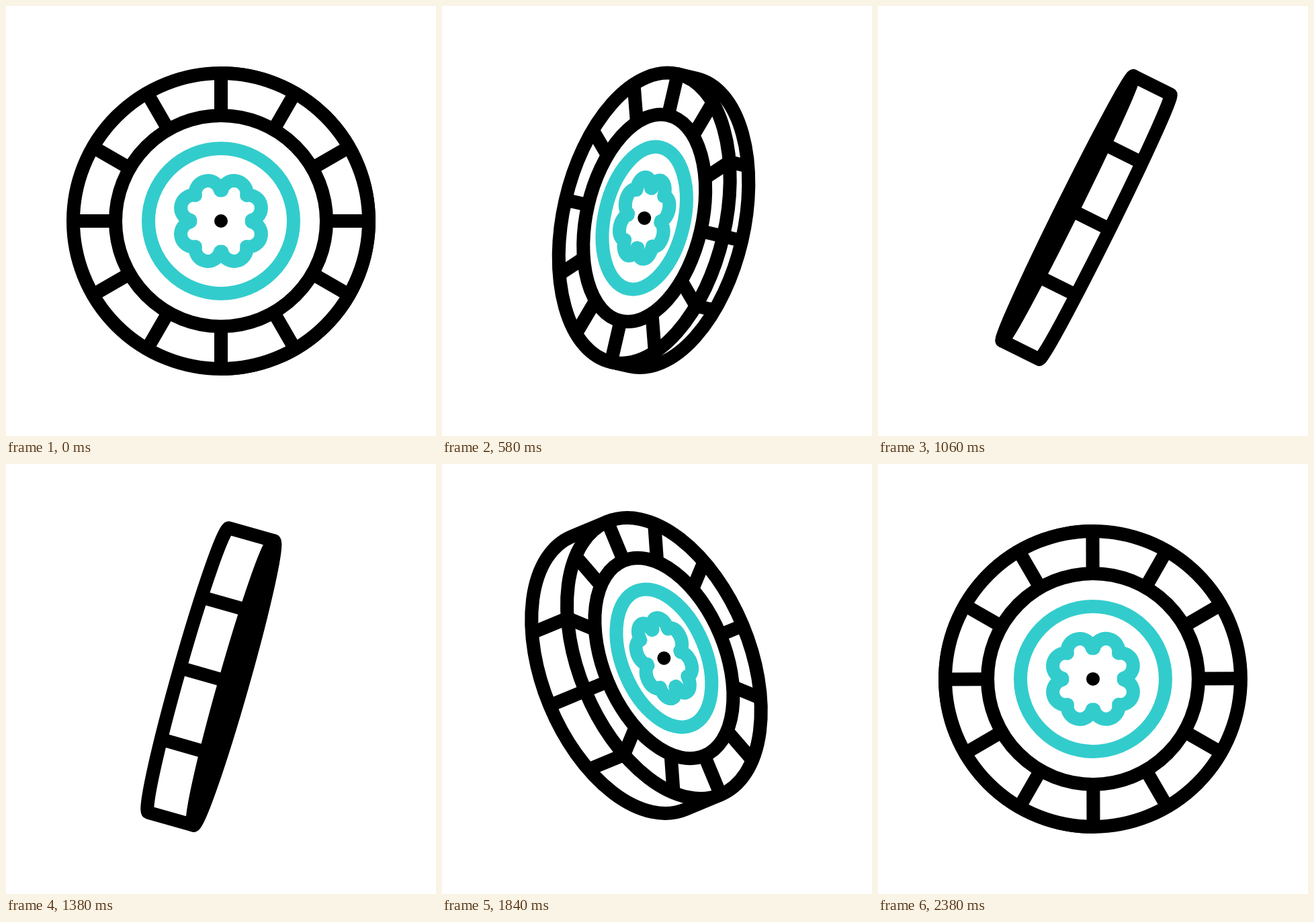
Write an HTML page with a canvas that moves like this. It is 640 px wide and 640 px high and loops after 2.4 s.

```html
<!DOCTYPE html>
<html>
<head>
<meta charset="utf-8">
<style>
  html, body { margin: 0; width: 100%; height: 100%; overflow: hidden; background: #fff; }
  canvas { display: block; }
</style>
</head>
<body>
<canvas id="stage" width="640" height="640"></canvas>
<script>
const ctx = document.getElementById('stage').getContext('2d');
const LOOP = 2400, HALF = LOOP / 2;
const RIM = 220, INNER = 157, DISC = 108, THICK = 70;
const DEG = Math.PI / 180, TEAL = '#33cccc';

// Smooth moves between [time, value] stops
function glide(time, ...stops) {
  let [from, value] = stops[0];
  for (const [to, next] of stops) {
    if (time <= from) break;
    const u = Math.min(1, (time - from) / (to - from || 1));
    value += (next - value) * u * u * (3 - 2 * u);
    from = to;
  }
  return value;
}

// Starts at speed and comes to rest edge-on
const quarterTurn = p => 90 * (1.2 * p + 0.6 * p * p - 0.8 * p ** 3);

function pose(time) {
  return {
    turn: time < HALF ? quarterTurn(time / HALF) : 180 - quarterTurn((LOOP - time) / HALF),
    lean: glide(time, [0, 0], [1200, 27.4], [1780, -22.5], [1980, -22.5], [LOOP, 0]),
    thickness: THICK * Math.min(1, time / HALF, (LOOP - time) / 410),
    x: glide(time, [1200, 320], [1620, 313.5], [1980, 313.5], [LOOP, 320]),
    y: glide(time, [1460, 320], [1920, 294], [LOOP, 320])
  };
}

// Builds a path on the foreshortened face, then strokes it at constant width
function strokeOnFace(x, squash, color, build, fill) {
  ctx.save();
  ctx.translate(x, 0);
  ctx.scale(squash, 1);
  ctx.beginPath();
  build();
  ctx.restore();
  if (fill) ctx.fill();
  ctx.strokeStyle = color;
  ctx.stroke();
}

const circle = r => () => {
  ctx.arc(0, 0, r, 0, 2 * Math.PI);
  ctx.closePath();
};

// Four heart-shaped leaves, each of two arcs
function clover() {
  ctx.rotate(45 * DEG);
  for (let leaf = 0; leaf < 4; leaf++) {
    ctx.arc(42.8, -15.2, 18.9, -121 * DEG, 54 * DEG);
    ctx.arc(42.8, 15.2, 18.9, -54 * DEG, 121 * DEG);
    ctx.lineTo(32.5, 32.5);
    ctx.rotate(90 * DEG);
  }
  ctx.closePath();
}

function spokes() {
  for (let a = 0; a < 360; a += 30) {
    const x = Math.cos(a * DEG), y = Math.sin(a * DEG);
    ctx.moveTo(INNER * x, INNER * y);
    ctx.lineTo(RIM * x, RIM * y);
  }
}

function drawSide(face, far, squash) {
  const toFar = far < face ? -1 : 1;
  ctx.strokeStyle = '#000';
  ctx.beginPath();
  ctx.moveTo(face, -RIM);
  ctx.ellipse(far, 0, RIM * squash, RIM, 0, -Math.PI / 2, Math.PI / 2, toFar < 0);
  ctx.lineTo(face, RIM);
  ctx.closePath();
  ctx.fill();
  ctx.stroke();
  ctx.beginPath();
  for (const a of [-30, 0, 30]) {
    const x = toFar * RIM * squash * Math.cos(a * DEG), y = RIM * Math.sin(a * DEG);
    ctx.moveTo(face + x, y);
    ctx.lineTo(far + x, y);
  }
  ctx.stroke();
}

function drawFace(x, squash) {
  strokeOnFace(x, squash, '#000', circle(RIM), true);
  strokeOnFace(x, squash, TEAL, circle(DISC));
  strokeOnFace(x, squash, TEAL, clover);
  strokeOnFace(x, squash, '#000', spokes);
  strokeOnFace(x, squash, '#000', circle(INNER));
  ctx.fillStyle = '#000';
  ctx.beginPath();
  ctx.arc(x, 0, 10, 0, 2 * Math.PI);
  ctx.fill();
}

function draw(time) {
  const { turn, lean, thickness, x, y } = pose(time);
  const squash = Math.max(Math.abs(Math.cos(turn * DEG)), 0.001);
  const depth = thickness * Math.sin(turn * DEG);
  const ends = [-0.68 * depth, 0.32 * depth];
  const [face, far] = turn < 90 ? ends : ends.reverse();

  ctx.setTransform(1, 0, 0, 1, 0, 0);
  ctx.fillStyle = '#fff';
  ctx.fillRect(0, 0, 640, 640);
  ctx.translate(x, y);
  ctx.rotate(lean * DEG);
  ctx.lineWidth = 20;
  ctx.lineJoin = 'round';
  drawSide(face, far, squash);
  drawFace(face, squash);
}

const start = performance.now();
function tick() {
  draw((performance.now() - start) % LOOP);
  requestAnimationFrame(tick);
}
tick();
</script>
</body>
</html>
```
